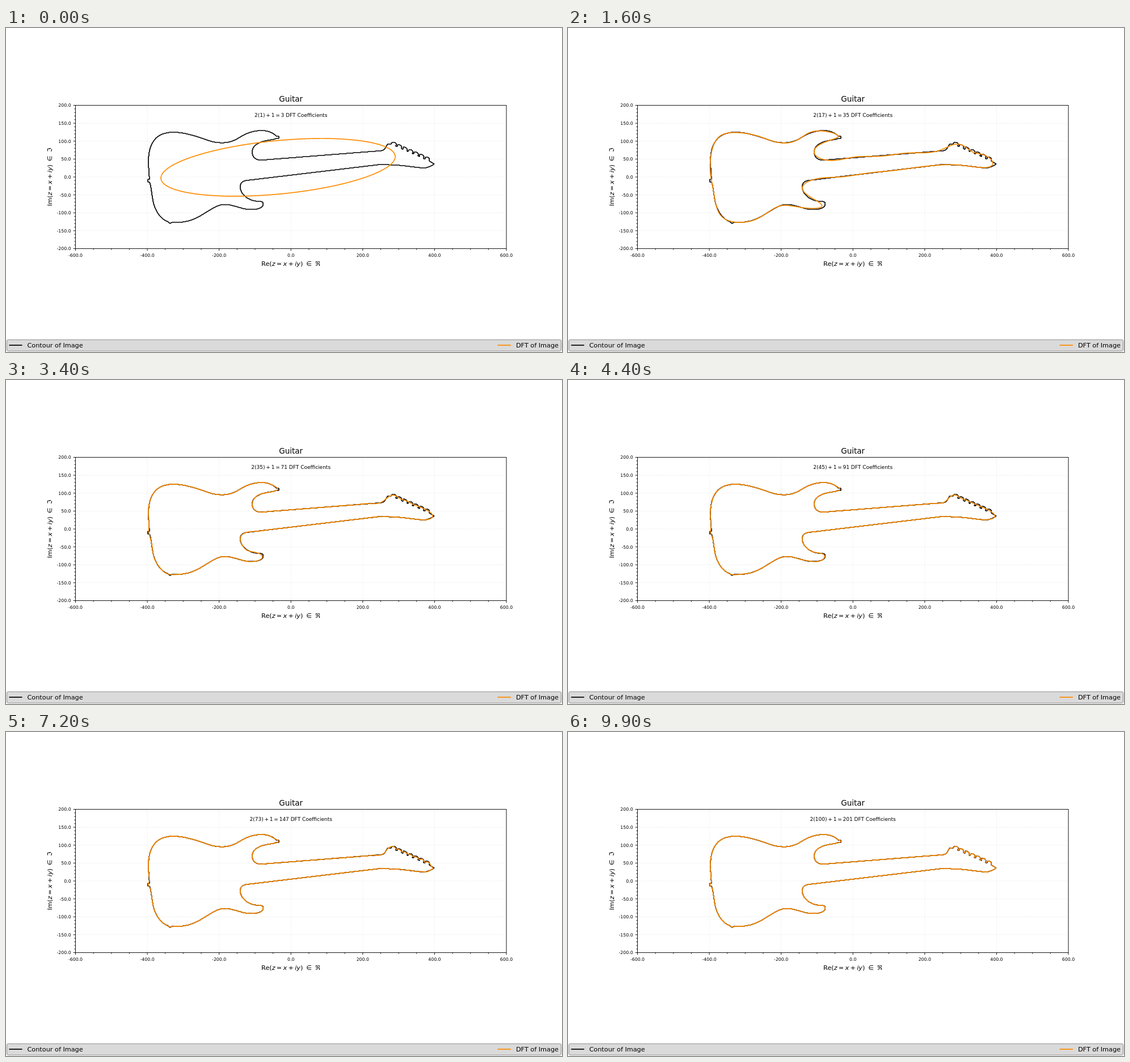
These frames come from a looping animation (980x572 px, 10 s). An HTML page:

```html
<!DOCTYPE html>
<html lang="en">
<head>
<meta charset="utf-8">
<title>Guitar</title>
<style>
  html, body { margin: 0; width: 100%; height: 100%; overflow: hidden; background: #fff; }
  svg { display: block; }
  text { font-family: "DejaVu Sans", sans-serif; font-size: 11.25px; }
  .tick { font-size: 7.8px; }
  .mid { text-anchor: middle; }
  .end { text-anchor: end; }
  .line { fill: none; stroke-width: 1.7; stroke-linejoin: round; }
  .black { stroke: #000; }
  .orange { stroke: #ff8c00; }
  i, .it { font-style: italic; }
</style>
</head>
<body>
<svg width="980" height="572" viewBox="0 0 980 572">
  <path id="grid" fill="none" stroke="#d3d3d3" stroke-width=".6" stroke-dasharray=".9 1.5"/>
  <path id="contour" class="line black"/>
  <path id="series" class="line orange"/>
  <rect x="122.5" y="136.5" width="759.5" height="253" fill="none" stroke="#000" stroke-width=".9"/>
  <path id="ticks" stroke="#000" stroke-width=".9"/>
  <g id="labels"></g>
  <text class="mid" x="502.2" y="129.5" style="font-size:13.5px">Guitar</text>
  <text class="mid" id="count" x="502.2" y="156.6" style="font-size:9px"></text>
  <text class="mid" id="re" x="502" y="420"></text>
  <text class="mid" id="im" transform="translate(81 263) rotate(-90)"></text>
  <rect x="1.5" y="550.3" width="977" height="20" rx="2.3" fill="#dadada" stroke="#8f8f8f"/>
  <path class="line black" d="M5.5 560H28.5"/>
  <text x="37.5" y="564">Contour of Image</text>
  <path class="line orange" d="M866.5 560H890"/>
  <text class="end" x="974" y="564">DFT of Image</text>
</svg>
<script>
const el = id => document.getElementById(id);
const STEPS = 100, STEP_MS = 100;

// Axes
const px = v => 502.25 + v * 0.6329, py = v => 263 - v * 0.6325;
let grid = "", ticks = "", labels = "";
for (let v = -600; v <= 600; v += 50) {
  const x = px(v), major = v % 200 === 0;
  ticks += `M${x} 389.5v${major ? 3.9 : 2.2}`;
  if (!major) continue;
  grid += `M${x} 389.5V136.5`;
  labels += `<text class="tick mid" x="${x}" y="403.6">${v.toFixed(1)}</text>`;
}
for (let v = -200; v <= 200; v += 10) {
  const y = py(v), major = v % 50 === 0;
  ticks += `M122.5 ${y}h${major ? -3.9 : -2.2}`;
  if (!major) continue;
  grid += `M122.5 ${y}H882`;
  labels += `<text class="tick end" x="114.6" y="${y + 2.9}">${v.toFixed(1)}</text>`;
}
el("grid").setAttribute("d", grid);
el("ticks").setAttribute("d", ticks);
el("labels").innerHTML = labels;

const thin = "\u2009";
const it = s => `<tspan class="it">${s}</tspan>`;
const axisName = (part, set) =>
  `${part}(${it("z")}${thin}=${thin}${it("x")}${thin}+${thin}${it("iy")}) ${thin}∈ ${thin}${set}`;
el("re").innerHTML = axisName("Re", "ℜ");
el("im").innerHTML = axisName("Im", "ℑ");

// Guitar outline: upper body and neck, headstock with six pegs, lower neck and body
const peg = "l2.8 .4l.2-3.2q5.8-.8 7.4 3.6l-.6 3.5";
const outline = `M253 267L252.5 262C251.5 250 251 240 251.3 230
  C252 212 258 200 266 193C274 186.5 284 184 296 184
  C316 184.3 338 192 352 197C361 200 368 202.6 381 202.6
  C401 202.6 410 193 422 187.5C432 183 441 181 452 181
  C463 181.3 472 186 476 190.5L481 191L480.5 195.5L476 194.5
  Q474 196.5 470 197C455 199 434 203 434 219C434 228 440 232 447 233.5
  L662 216.6C669 215 669 210 671.5 207L672.5 204.5L679 205L680 202
  Q686 200.5 688 204.5L687 209${peg.repeat(6)}
  L755 240Q750 244 738 247.3C715 245.5 700 242 675 241.5L661 240.8
  L425 269C414 270 413 276 413 281C413 291 423 303 440 305.5
  C446 306 449 305.5 452.5 307.5L453.5 312C452.5 318 442 320.5 432 320.5
  C415 320.5 402 311.5 384 311.5C370 311.5 350 329 333 336.5
  C319 342.5 308 343.5 292 343.5L289 345L284.5 341.5
  C272 337 263 322 260 309C257 296 256.5 285 254.5 277L253 271.5
  L249.5 271.5L249.5 267Z`;

// Trace the outline on a pixel grid, one point per crossed pixel edge
function trace(d) {
  const path = el("contour");
  path.setAttribute("d", d);
  const cells = [], length = path.getTotalLength();
  for (let s = 0; s < length; s += 0.2) {
    const p = path.getPointAtLength(s), x = Math.round(p.x), y = Math.round(p.y);
    const last = cells[cells.length - 1];
    if (!last || last[0] !== x || last[1] !== y) cells.push([x, y]);
  }
  return cells.map(([x, y], i) => {
    const [u, v] = cells[(i + 1) % cells.length];
    return [(x + u) / 2, (y + v) / 2];
  });
}
const toPath = pts => "M" + pts.map(p => p[0].toFixed(2) + " " + p[1].toFixed(2)).join("L") + "Z";

const points = trace(outline), N = points.length;
el("contour").setAttribute("d", toPath(points));

// Partial Fourier sums, each adding the harmonics +n and -n
const cos = points.map((_, j) => Math.cos(2 * Math.PI * j / N));
const sin = points.map((_, j) => Math.sin(2 * Math.PI * j / N));
const sum = points.map(() => [0, 0]);
function addHarmonic(k) {
  const at = j => ((k * j) % N + N) % N;
  let re = 0, im = 0;
  points.forEach(([x, y], j) => {
    const m = at(j);
    re += (x * cos[m] + y * sin[m]) / N;
    im += (y * cos[m] - x * sin[m]) / N;
  });
  sum.forEach((p, j) => {
    const m = at(j);
    p[0] += re * cos[m] - im * sin[m];
    p[1] += re * sin[m] + im * cos[m];
  });
}
addHarmonic(0);
const curves = [];
for (let n = 1; n <= STEPS; n++) {
  addHarmonic(n);
  addHarmonic(-n);
  curves.push(toPath(sum));
}

let shown = 0;
const start = performance.now();
function draw(now) {
  const n = Math.floor(Math.max(0, now - start) / STEP_MS) % STEPS + 1;
  if (n !== shown) {
    shown = n;
    el("series").setAttribute("d", curves[n - 1]);
    el("count").textContent =
      `2(${n})${thin}+${thin}1${thin}=${thin}${2 * n + 1} DFT Coefficients`;
  }
  requestAnimationFrame(draw);
}
draw(start);
</script>
</body>
</html>
```
